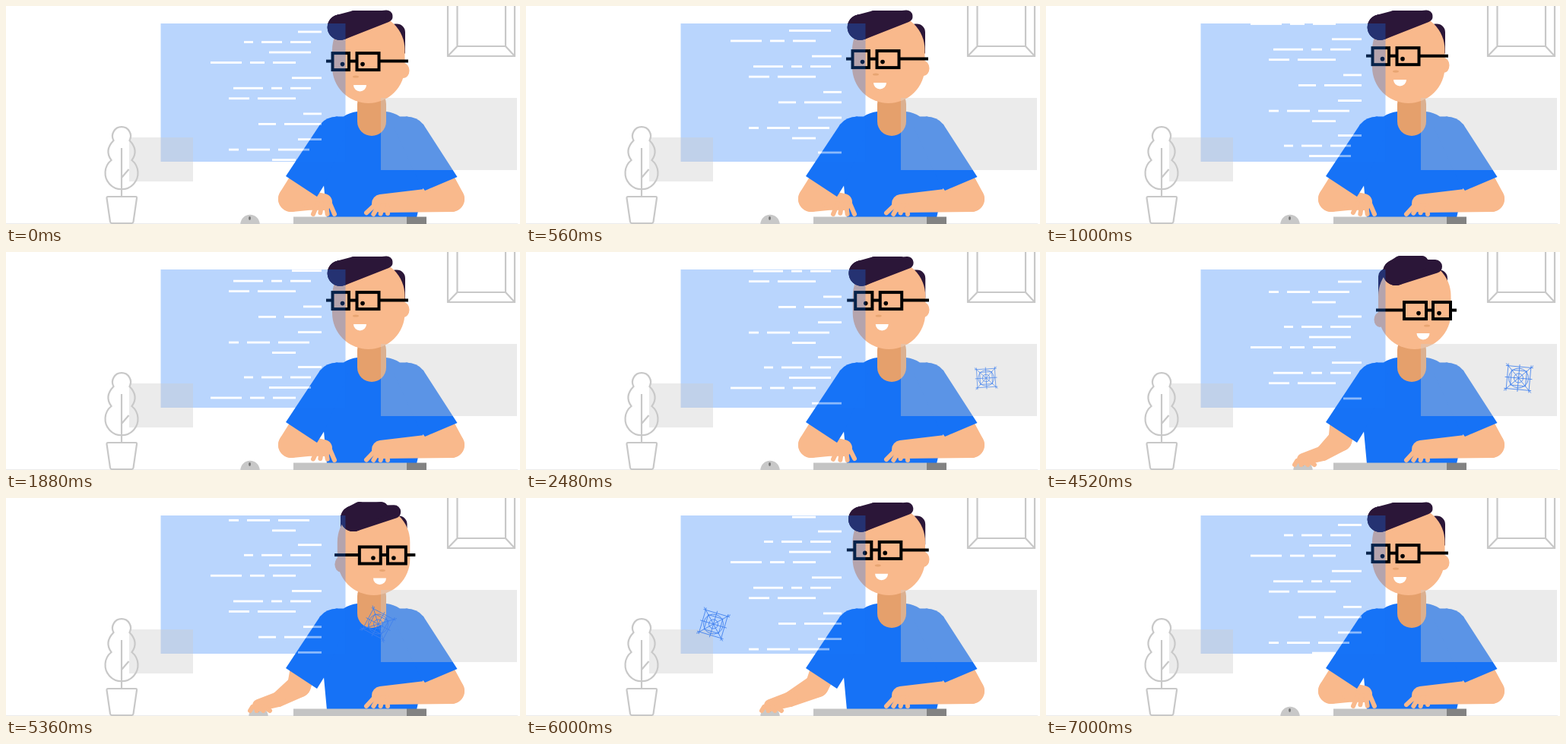
Animation of 676x287 px, one loop 7.04 s. Source, as an HTML page with a canvas:

```html
<!DOCTYPE html>
<html lang="en">
<head>
<meta charset="utf-8">
<title>Developer at a desk</title>
<style>
html, body { margin: 0; width: 100%; height: 100%; overflow: hidden; background: #fff; }
canvas { display: block; }
</style>
</head>
<body>
<canvas id="stage" width="676" height="287"></canvas>
<script>
const g = document.getElementById('stage').getContext('2d');
const LOOP = 7.04, TAU = Math.PI * 2, CODE_HEIGHT = 187.5;
const SKIN = '#f9b98c', HAIR = '#2b1638', BLUE = '#1672f6', GRAY = '#c8c8c8';
const VEIL = 'rgba(202,202,202,.38)';

const mix = (a, b, k) => a + (b - a) * k;
const mixAll = (a, b, k) => a.map((v, i) => mix(v, b[i], k));
const ease = (t, from, to) => {
  const u = Math.min(1, Math.max(0, (t - from) / (to - from)));
  return u * u * (3 - 2 * u);
};

// Motion of each part, t in seconds
const turnAt = t => ease(t, 2.34, 3.1) - ease(t, 5.1, 6.17);
const nodAt = t => -9 * ease(t, 0, 1.45) + 13 * ease(t, 2.48, 3.1) - 8.2 * ease(t, 5.1, 6) + 4.2 * ease(t, 6.2, 6.9);
const reachAt = t => ease(t, 3.6, 4) - ease(t, 6.1, 6.5);
const mouseAt = t => 321 + 17 * (ease(t, 4.05, 4.45) - ease(t, 5, 5.9));
const iconX = t => 539 + 82.5 * ease(t, 2.18, 2.6) - 375 * ease(t, 5, 5.9);
const iconSize = t => ease(t, 2.18, 2.6) - ease(t, 6.4, 6.75);
const iconAngle = t => -.49 * Math.sin(TAU * (t - 2.4) / 4);

// Scrolling speeds up and slows down between these moments
const SCROLL = [[0, 0], [1, 51], [2.48, 83], [3.44, 103.5], [4.52, 136.5], [6, 177.5], [7, 186], [LOOP, CODE_HEIGHT]];
function scrollAt(t) {
  const i = SCROLL.findIndex(([at]) => at > t);
  const [t0, y0] = SCROLL[i - 1], [t1, y1] = SCROLL[i];
  return mix(y0, y1, (t - t0) / (t1 - t0));
}

// Blocks of code; each row holds its right indent and its word widths
const BLOCKS = [
  [[0, 31], [14, 12, 27, 27], [14, 55], [34, 41, 19, 30]],
  [[0, 39], [14, 39, 14, 27], [34, 27, 50]],
  [[0, 24], [0, 23, 49]],
  [[0, 31], [16, 13, 30, 41], [34, 31]]
];

const torso = new Path2D('M462 139Q452 140 444 145.5H434L413 156L400 190L418 236L422 279H540L549 238L560 190L549 156L528 145.5H518Q510 140 500 139Z');
const sleeveL = new Path2D('M436 145.5Q421 145.5 413 156L368 224L409 251L419 235L450 160Z');
const sleeveR = new Path2D('M526 145.5Q541 145.5 549 156L593.5 225L551 243L545 236L510 160Z');
const shirt = new Path2D();
[torso, sleeveL, sleeveR].forEach(p => shirt.addPath(p));

function fill(path, color) { g.fillStyle = color; g.fill(path); }
function box(x, y, w, h, color) { g.fillStyle = color; g.fillRect(x, y, w, h); }
function disc(x, y, r, color, ry = r) {
  g.fillStyle = color;
  g.beginPath();
  g.ellipse(x, y, r, ry, 0, 0, TAU);
  g.fill();
}
function rounded(x, y, w, h, r, color) {
  g.fillStyle = color;
  g.beginPath();
  g.roundRect(x, y, w, h, r);
  g.fill();
}
function halfDisc(x, y, r, from, color) {
  g.fillStyle = color;
  g.beginPath();
  g.arc(x, y, r, from, from + Math.PI);
  g.fill();
}
function line(x1, y1, x2, y2, w, color) {
  g.strokeStyle = color;
  g.lineWidth = w;
  g.beginPath();
  g.moveTo(x1, y1);
  g.lineTo(x2, y2);
  g.stroke();
}
function outline(d) {
  g.strokeStyle = GRAY;
  g.lineWidth = 2.2;
  g.stroke(new Path2D(d));
}

// Hull of two circles
function limb([x1, y1, r1], [x2, y2, r2], color = SKIN) {
  const a = Math.atan2(y2 - y1, x2 - x1);
  const b = Math.acos((r1 - r2) / Math.hypot(x2 - x1, y2 - y1));
  g.fillStyle = color;
  g.beginPath();
  g.arc(x1, y1, r1, a + b, a - b + TAU);
  g.arc(x2, y2, r2, a - b, a + b);
  g.fill();
}

function room() {
  box(0, 286, 673, 1, '#ececec');
  outline('M581 0V66H669V0M593.5 0V53H657V0M581 66L593.5 53M669 66L657 53');
  outline('M141.5 177A12 12 0 1 1 162.5 177Q175 190 165.5 203A21.5 21.5 0 1 1 138.5 203Q129 190 141.5 177ZM152 187V251M152 226L161.5 215');
  outline('M134 251H171Q172 251 172 253L167.5 284Q167 286 165 286H139.5Q137.5 286 137 284L132.5 253Q132.5 251 134 251Z');
}

function desk(mx) {
  halfDisc(mx, 287.5, 12.7, Math.PI, GRAY);
  disc(mx - .5, 279.5, 1.5, '#777', 2.4);
  box(378, 277.5, 149, 9.5, '#c4c4c4');
  box(527, 277.5, 26, 9.5, '#828282');
}

// Four fingers fan out from the palm, each tapping in its own rhythm
function hand([x, y], first, last, tipY, t, energy) {
  g.lineCap = 'round';
  for (let i = 0; i < 4; i++) {
    const k = i / 3;
    const lift = Math.max(0, Math.sin(TAU * t * (23 + i * 3) / LOOP + i * 2)) * 2 * energy;
    line(x + mix(-8, 8, k), y + 2, x + mix(first, last, k), tipY - lift, 6, SKIN);
  }
  g.lineCap = 'butt';
}

function arms(t, reach, mx) {
  const dx = mx - 338;
  const pose = (typing, [x, y, r], follow) => mixAll(typing, [x + dx * follow, y, r], reach);
  const elbow = pose([375, 254, 17], [387, 247, 15.5], .25);
  const wrist = pose([401, 256, 12.5], [364, 265, 10], 1);
  const palm = pose([418, 258, 11], [338, 273, 8], 1);
  limb([390, 230, 17], elbow);
  limb(elbow, wrist);
  limb(wrist, palm);
  hand(palm, mix(-14, -11, reach), mix(14, 15, reach), mix(274, 280, reach), t, 1 - reach);

  const palmR = [493, 260, 12];
  limb([572, 228, 17], [586, 254, 17]);
  limb([586, 254, 17], palmR);
  hand(palmR, -19, 9, 274, t + .1, 1 - reach);
}

function glasses(p, y) {
  const bar = (x1, x2) => line(x1, y, x2, y, 4, '#000');
  const a = mix(429.5, 471, p), aw = mix(21.5, 29, p);
  const b = mix(461.5, 509, p), bw = mix(29, 23, p);
  for (const x of [mix(442.5, 490, p), mix(469, 517, p)]) disc(x, y + 4, 2.8, '#000');
  g.strokeStyle = '#000';
  g.lineWidth = 4;
  g.strokeRect(a, y - 10.5, aw, 22);
  g.strokeRect(b, y - 10.5, bw, 22);
  bar(mix(421, 434, p), a);
  bar(a + aw, b);
  bar(b + bw, mix(529, 540, p));
}

function head(p, v) {
  const m = (a, b) => mix(a, b, p);
  rounded(m(508, 508), 23.5, m(17, 20), m(39, 19), [4, 11, 0, 0], HAIR);
  rounded(m(457, 437), 22, 28, 40, [10, 0, 0, 0], HAIR);
  disc(mix(523, 439, ease(p, .1, .9)), 85 + v, 7.5, SKIN, 10);
  rounded(m(429, 437), 10, 95.5, 118, 47.7, SKIN);

  const lobe = mixAll([439.5, 28, 16.8], [460, 27, 17], p);
  const top = mixAll([458, 14, 8], [466, 15, 10], p);
  const crown = mixAll([492, 14, 8], [494, 14, 9], p);
  const tip = mixAll([500.5, 13.5, 8], [512, 19, 9], p);
  for (const [a, b] of [[lobe, top], [top, crown], [lobe, tip], [lobe, crown]]) limb(a, b, HAIR);

  disc(m(460, 501), 93 + v, 4, '#e8a572', 1.6);
  halfDisc(m(465.5, 496), m(104, 103) + v, 8.5, 0, '#fff');
  glasses(p, 72.6 + v);
}

function codeLines(offset, clip, rule, alpha) {
  g.save();
  g.beginPath();
  g.rect(203, 22.5, 244, 182.5);
  g.clip();
  g.clip(clip, rule);
  g.globalAlpha = alpha;
  let y = 34 - offset;
  for (const block of BLOCKS) {
    for (const [indent, ...words] of block) {
      let x = 415 - indent;
      for (const w of words.reverse()) {
        for (const wrap of [0, CODE_HEIGHT]) box(x - w, y + wrap - 1.4, w, 2.8, '#fff');
        x -= w + 11;
      }
      y += 13.5;
    }
    y += 6.7;
  }
  g.restore();
}

function screen(offset) {
  box(203.5, 23, 243, 182, 'rgba(26,115,248,.3)');
  const outside = new Path2D();
  outside.rect(0, 0, 676, 287);
  outside.addPath(sleeveL);
  codeLines(offset, outside, 'evenodd', 1);
  codeLines(offset, shirt, 'nonzero', .5);
}

function icon(t) {
  const s = iconSize(t);
  if (s <= 0) return;
  g.save();
  g.translate(iconX(t), 166);
  g.rotate(iconAngle(t));
  g.scale(s, s);
  g.strokeStyle = '#3f80ee';
  g.lineWidth = .8;
  g.beginPath();
  for (const k of [-15, 0, 15]) {
    g.moveTo(k, -18);
    g.lineTo(k, 18);
    g.moveTo(-18, k);
    g.lineTo(18, k);
  }
  for (const d of [-1, 1]) {
    g.moveTo(-18, -18 * d);
    g.lineTo(18, 18 * d);
  }
  for (const r of [6, 13]) {
    g.moveTo(r, 0);
    g.arc(0, 0, r, 0, TAU);
  }
  g.rect(-10, -10, 20, 20);
  g.stroke();
  g.restore();
}

function draw(t) {
  const mx = mouseAt(t);
  box(0, 0, 676, 287, '#fff');
  room();
  fill(torso, BLUE);
  rounded(462, 110, 38, 61, 19, '#e5a06c');
  head(turnAt(t), nodAt(t));
  desk(mx);
  arms(t, reachAt(t), mx);
  fill(sleeveL, BLUE);
  fill(sleeveR, BLUE);
  screen(scrollAt(t));
  box(162, 173, 84, 58, VEIL);
  box(493, 121, 179, 95, VEIL);
  icon(t);
}

const start = performance.now();
function tick() {
  const ms = (performance.now() - start) % (LOOP * 1000);
  draw(Math.floor(ms / 40) * .04);
  requestAnimationFrame(tick);
}
tick();
</script>
</body>
</html>
```
